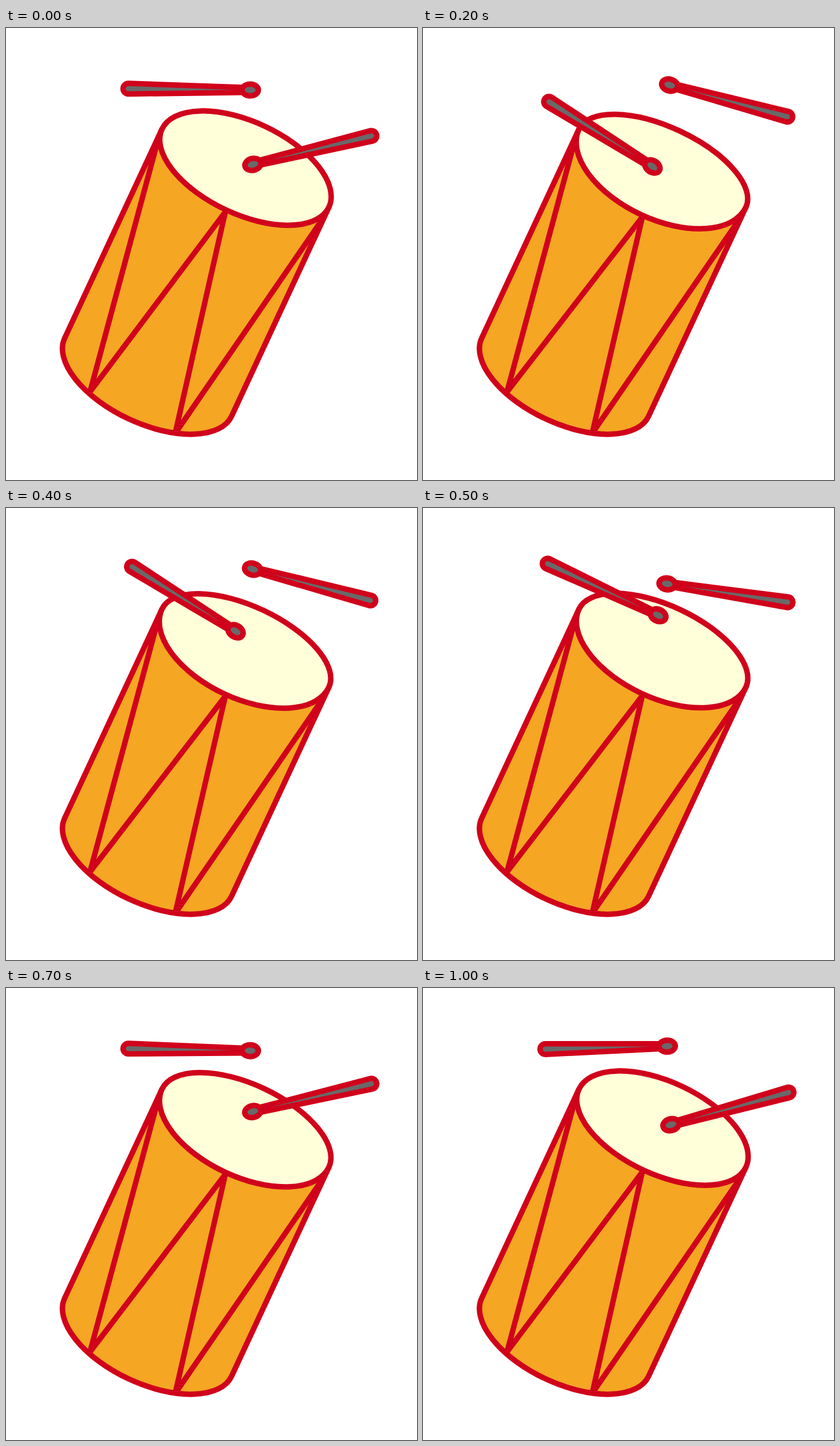
These frames come from a looping animation (714 px wide and 784 px high, 1.1 s). An HTML page:

```html
<!DOCTYPE html>
<html lang="en">
<head>
<meta charset="utf-8">
<title>Drum</title>
<style>
  html, body { margin: 0; width: 100%; height: 100%; overflow: hidden; background: #fff; }
  svg { display: block; width: 100vw; height: 100vh; }
  .ink { stroke: #d0021b; stroke-width: 9.5; }
  .body { fill: #f5a623; }
  .skin { fill: #ffffda; }
  .grey { fill: #696969; }
</style>
</head>
<body>
<svg viewBox="0 0 714 784">
  <defs>
    <!-- grip at the origin, tip on the right -->
    <g id="stick" class="ink grey">
      <path d="M198,-4.3 L0,-9.2 A9.2,9.2 0 0 0 0,9.2 L198,4.3 Z"/>
      <ellipse cx="211.7" rx="14.2" ry="10.3"/>
    </g>
  </defs>
  <path class="ink body" transform="translate(416 243) rotate(25)"
        d="M-160,0 V400 A160,80 0 0 0 160,400 V0"/>
  <polyline id="cords" class="ink" fill="none" stroke-linecap="round"/>
  <path id="skin" class="ink skin" transform="translate(416 243) rotate(25)"/>
  <use id="left" href="#stick"/>
  <use id="right" href="#stick"/>
</svg>
<script>
  const STEP = 100, STEPS = 11, LOOP = STEP * STEPS;
  const el = id => document.getElementById(id);
  const ramp = (t, from, to) => Math.min(1, Math.max(0, (t - from) / (to - from)));
  const ease = (t, from, to) => (1 - Math.cos(Math.PI * ramp(t, from, to))) / 2;

  // 0: right stick down, 1: left stick down. A quick stroke, a slower return.
  const swing = t =>
    ease(t, -24, 128) - ease(t, 385, 765) + ease(t, LOOP - 24, LOOP + 128);

  function place(id, x, y, angle) {
    el(id).setAttribute('transform', `translate(${x} ${y}) rotate(${angle})`);
  }

  function drawSkin(sag) {
    el('skin').setAttribute('d',
      `M-160,0 A160,${80 - sag} 0 0 1 160,0 A160,${80 + sag} 0 0 1 -160,0 Z`);
    el('cords').setAttribute('points',
      `266,187 146,631 381,${319 + sag} 294,703 553,327`);
  }

  function draw() {
    // The cycle begins with the hit, one step after the page loads.
    const step = 1 + (Math.floor(performance.now() / STEP) + STEPS - 1) % STEPS;
    const t = step * STEP;
    const s = swing(t);
    const lift = 47 * ramp(t, 100, 460);
    const sink = 43.7 * ramp(t, 275, LOOP);

    drawSkin(9.3 * (1 - ramp(t, 100, 1000) ** 1.5));
    place('left', 212.5 + 6.5 * s * s, 153 - 12 * s - lift, 33.4 * s - 1.4);
    place('right', 635 - 2 * s, 142.8 + 11 * s + sink, 164.7 + 30.3 * s);
    requestAnimationFrame(draw);
  }
  draw();
</script>
</body>
</html>
```
